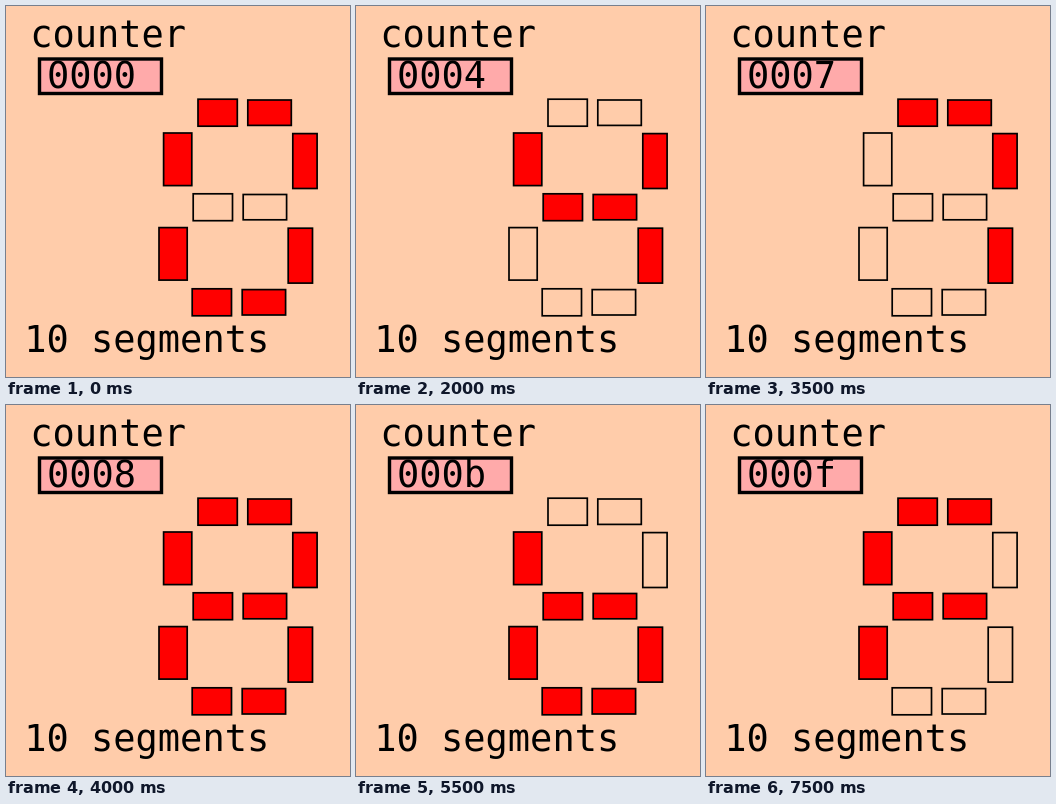
An HTML page that plays this animation: 344 by 371 pixels, repeating every 8 s.

```html
<!DOCTYPE html>
<html lang="en">
<head>
<meta charset="utf-8">
<title>Ten-segment counter</title>
<style>
html, body { margin: 0; width: 100%; height: 100%; overflow: hidden; background: #ffccaa; }
svg { display: block; width: 344px; height: 371px; }
text { font: 37px "DejaVu Sans Mono", monospace; white-space: pre; }
#cells rect { stroke: #000; stroke-width: 1.7; fill: none; }
#cells .on { fill: #f00; }
</style>
</head>
<body>
<svg viewBox="0 0 344 371">
  <rect width="344" height="371" fill="#ffccaa"/>
  <text x="24.2" y="41">counter</text>
  <rect x="33.5" y="53" width="122" height="34.5" fill="#ffaaaa" stroke="#000" stroke-width="3.4"/>
  <text id="count" x="41" y="82">0000</text>
  <g id="cells"></g>
  <text x="18.2" y="346">10 segments</text>
</svg>
<script>
const STEP = 500;

// Lit parts for each hex digit: a top, b/c right, d bottom, e/f left, g middle.
const LIT = "abcdef bc abged abgcd fgbc afgcd fgecd abc abcdefg abcfg abcefg fgecd afed bgecd afged afge".split(" ");

// Part name, x, y, width, height.
const CELLS = [
  ["a", 192, 93.2, 39.3, 27],
  ["a", 241.8, 94, 43.5, 25.4],
  ["f", 157.6, 127, 28.2, 52.6],
  ["b", 286.8, 127.6, 24.3, 54.9],
  ["g", 187.2, 187.8, 39.3, 26.9],
  ["g", 237.2, 188.5, 43.4, 25.3],
  ["e", 153, 221.6, 28.2, 52.5],
  ["c", 282.2, 222.2, 24.3, 54.9],
  ["d", 186.2, 282.8, 39.3, 27],
  ["d", 236.2, 283.6, 43.4, 25.4]
];

const group = document.getElementById("cells");
const count = document.getElementById("count");

const rects = CELLS.map(([part, x, y, width, height]) => {
  const rect = document.createElementNS(group.namespaceURI, "rect");
  for (const [key, value] of Object.entries({ x, y, width, height })) {
    rect.setAttribute(key, value);
  }
  group.append(rect);
  return { part, rect };
});

let shown = -1;

function show(digit) {
  if (digit === shown) return;
  shown = digit;
  count.textContent = digit.toString(16).padStart(4, "0");
  for (const { part, rect } of rects) {
    rect.classList.toggle("on", LIT[digit].includes(part));
  }
}

function tick() {
  show(Math.floor((performance.now() - start) / STEP) % LIT.length);
  requestAnimationFrame(tick);
}

const start = performance.now();
show(0);
requestAnimationFrame(tick);
</script>
</body>
</html>
```
